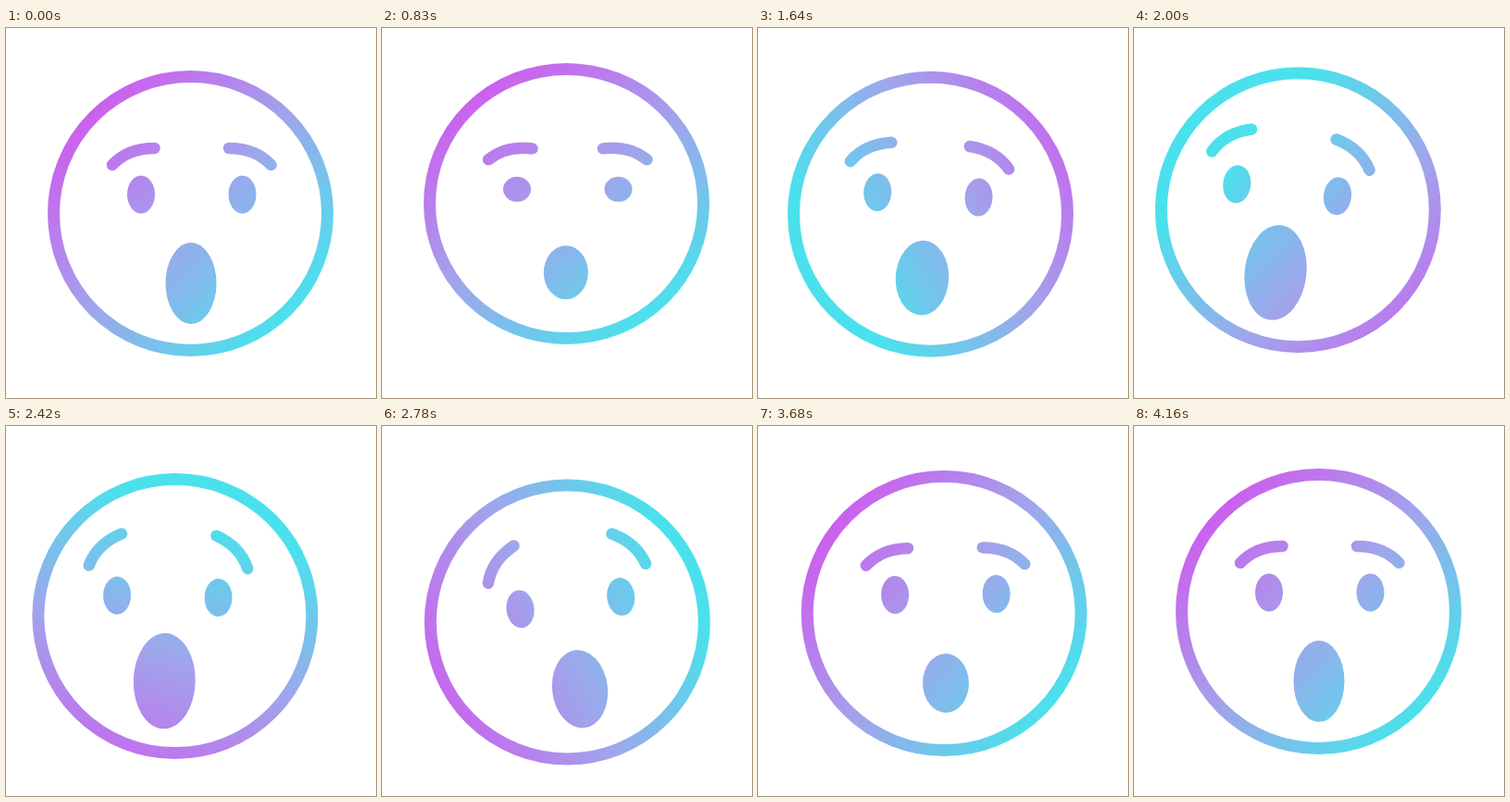
These frames come from a looping animation (400x400 px, 4.19 s). An HTML page with a canvas:

```html
<!DOCTYPE html>
<html lang="en">
<head>
<meta charset="utf-8">
<title>Surprised face</title>
<style>
  html, body { margin: 0; width: 100%; height: 100%; overflow: hidden; background: #fff; }
  canvas { display: block; width: 400px; height: 400px; }
</style>
</head>
<body>
<canvas id="stage" width="400" height="400"></canvas>
<script>
const ctx = document.getElementById('stage').getContext('2d');
const LOOP = 4190, HOLD = 530, STEP = 30;
const TINTS = ['#cb60ee', '#a0a5eb', '#4be1ec'];
const RAD = Math.PI / 180;

const clamp = (v, lo, hi) => Math.min(hi, Math.max(lo, v));

// Eases in and out between turning points, each given as [time, value].
const swing = (...keys) => t => keys.slice(1).reduce((v, [t1, v1], i) => {
  const [t0, v0] = keys[i];
  const u = clamp((t - t0) / (t1 - t0), 0, 1);
  return v + (v1 - v0) * u * u * (3 - 2 * u);
}, keys[0][1]);

const headX = swing([1070, 199.5], [2120, 176.5], [3390, 221.5], [3740, 199.5]);
const headY = swing([500, 200.5], [680, 226.5], [850, 188.5], [1040, 188.5], [1560, 201.5],
  [2060, 196.5], [2720, 212.5], [3380, 193.5], [3750, 203.5], [3960, 196.5], [4160, 200.5]);
const headRy = swing([500, 148], [680, 143], [980, 148]);
const tilt = swing([1300, 0], [2080, 7], [2860, -7.4], [3370, -7.4], [3740, 0]);
const lookX = swing([1370, 0], [2120, -16.5], [3000, 8.7], [3370, 8.7], [3740, 0]);
const drop = swing([500, 0], [740, 6], [1070, 0]);
const lids = swing([500, 1], [680, 0.15], [945, 1]);
const brows = swing([500, 0], [680, 11], [1070, 0], [1150, 0], [2780, -27], [3740, 0]);
const lift = swing([500, 0], [830, -6], [2000, -6], [3350, 0]);
const mouthRx = swing([500, 27.5], [720, 24], [1240, 24], [2040, 33.5], [2400, 33.5], [3350, 23.5], [4160, 27.5]);
const mouthRy = swing([500, 44], [720, 29], [1240, 29], [2040, 51.7], [2400, 51.7], [3350, 25], [4160, 44]);

// One full turn, fastest in the middle.
function hueAngle(t) {
  const u = clamp((t - 2000) / (t < 2000 ? 1500 : 2100), -1, 1);
  return (225 + 180 * u * (2 - Math.abs(u))) * RAD;
}

function oval(x, y, rx, ry) {
  ctx.beginPath();
  ctx.ellipse(x, y, rx, ry, 0, 0, 2 * Math.PI);
}

// Left eye and brow; the right side is its mirror image.
function eyeAndBrow(t) {
  oval(-54.75, -20.5, 15, 20.5 * lids(t));
  ctx.fill();
  ctx.save();
  ctx.translate(-85.75, -52.5);
  ctx.rotate(brows(t) * RAD);
  ctx.lineWidth = 12.5;
  ctx.lineCap = 'round';
  ctx.beginPath();
  ctx.moveTo(0, 0);
  ctx.quadraticCurveTo(17, -18, 45.5, -18);
  ctx.stroke();
  ctx.restore();
}

function drawFace(t) {
  ctx.fillStyle = ctx.strokeStyle = '#000';
  ctx.save();
  ctx.translate(headX(t), headY(t));
  ctx.lineWidth = 13;
  oval(0, 0, 148, headRy(t));
  ctx.stroke();

  const look = lookX(t), up = lift(t);
  ctx.translate(look, drop(t) - 0.08 * Math.abs(look));
  ctx.rotate(tilt(t) * RAD);
  oval(0.5 + 0.2 * up, 75.5 + up, mouthRx(t), mouthRy(t));
  ctx.fill();
  ctx.translate(1.25, 0);
  eyeAndBrow(t);
  ctx.scale(-1, 1);
  eyeAndBrow(t);
  ctx.restore();
}

// Colours whatever is drawn; the gradient slides along its axis as it turns.
function tintFace(t) {
  const angle = hueAngle(t), dx = Math.cos(angle), dy = Math.sin(angle);
  const shift = 31 * (1 - Math.cos(angle - 45 * RAD));
  const x = headX(t), y = headY(t), a = -154 - shift, b = 154 - shift;
  const tint = ctx.createLinearGradient(x + a * dx, y + a * dy, x + b * dx, y + b * dy);
  TINTS.forEach((color, i) => tint.addColorStop(i / 2, color));
  ctx.globalCompositeOperation = 'source-in';
  ctx.fillStyle = tint;
  ctx.fillRect(0, 0, 400, 400);
  ctx.globalCompositeOperation = 'source-over';
}

const start = performance.now();
function frame() {
  const now = (performance.now() - start) % LOOP;
  const t = now < HOLD ? 0 : HOLD + Math.floor((now - HOLD) / STEP) * STEP;
  ctx.clearRect(0, 0, 400, 400);
  drawFace(t);
  tintFace(t);
  requestAnimationFrame(frame);
}
frame();
</script>
</body>
</html>
```
